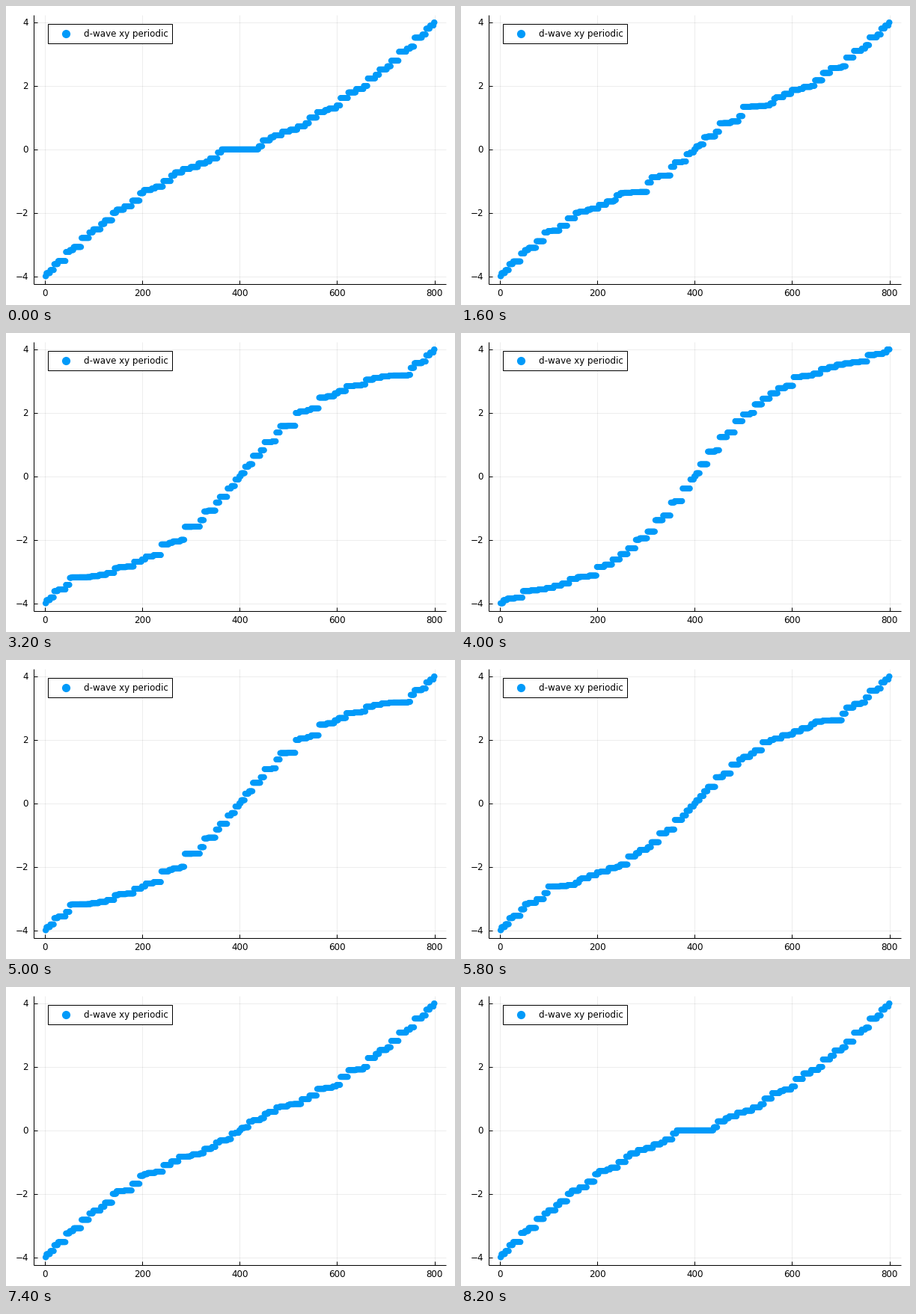
A matplotlib script for the animation above (8400 ms loop, 600 by 400 pixels).

```python
import numpy as np
import matplotlib.pyplot as plt
from matplotlib.animation import FuncAnimation
from matplotlib.patches import Rectangle

W, H, DPI = 600, 400, 100
PX = 72 / DPI                      # points per pixel
LEFT, RIGHT, TOP, BOTTOM = 37.2, 588.2, 11.8, 371.7
X_MIN, X_MAX = 1 - 0.03 * 799, 800 + 0.03 * 799
Y_MAX = 4.24
BLUE = "#009AF9"
FONT = dict(family="DejaVu Sans", size=11.9 * PX, color="black", va="baseline")

SITES = 20                         # lattice sites per side
STEPS = 20                         # pairing strength goes 0..4 in these steps
FRAMES = 2 * (STEPS + 1)


def to_px(x):
    return LEFT + (x - X_MIN) / (X_MAX - X_MIN) * (RIGHT - LEFT)


def to_py(y):
    return TOP + (Y_MAX - y) / (2 * Y_MAX) * (BOTTOM - TOP)


k = 2 * np.pi * np.arange(SITES) / SITES
kx, ky = np.meshgrid(k, k)
hopping = -2 * (np.cos(kx) + np.cos(ky))
pairing = np.sin(kx) * np.sin(ky)


def spectrum(delta):
    """Sorted quasiparticle energies of a periodic d_xy superconductor."""
    energy = np.hypot(hopping, delta * pairing).ravel()
    return np.sort(np.concatenate([-energy, energy]))


fig = plt.figure(figsize=(W / DPI, H / DPI), dpi=DPI, facecolor="white")
ax = fig.add_axes([0, 0, 1, 1])
ax.set_xlim(0, W)
ax.set_ylim(H, 0)
ax.axis("off")


def line(xs, ys, **style):
    ax.plot(xs, ys, color="black", lw=PX, solid_capstyle="butt", **style)


for x in range(0, 801, 200):
    px = to_px(x)
    line([px, px], [TOP, BOTTOM], alpha=0.07, zorder=1)
    line([px, px], [BOTTOM, BOTTOM - 5], zorder=2)
    ax.text(px, 388, str(x), ha="center", **FONT)

for y in range(-4, 5, 2):
    py = to_py(y)
    line([LEFT, RIGHT], [py, py], alpha=0.07, zorder=1)
    line([LEFT, LEFT + 5], [py, py], zorder=2)
    ax.text(30, py + 4.4, str(y).replace("-", "\u2212"), ha="right", **FONT)

line([LEFT, LEFT], [TOP, BOTTOM], zorder=2)
line([LEFT, RIGHT], [BOTTOM, BOTTOM], zorder=2)

# Per-point sizes keep every dot at its sub-pixel position
count = 2 * SITES ** 2
dot_x = to_px(np.arange(1, count + 1))
dots = ax.scatter(dot_x, to_py(spectrum(0)), s=np.full(count, (7.8 * PX) ** 2),
                  color=BLUE, linewidths=0, zorder=3)

ax.add_patch(Rectangle((55.5, 23.5), 166, 26, fc="white", ec="black",
                       lw=PX, zorder=4))
ax.scatter([80], [36.6], s=[(11.2 * PX) ** 2], color=BLUE, linewidths=0, zorder=5)
ax.text(103.6, 41, "d-wave xy periodic", ha="left", zorder=5, **FONT)


def update(i):
    step = min(i, FRAMES - 1 - i)
    dots.set_offsets(np.column_stack([dot_x, to_py(spectrum(4 * step / STEPS))]))
    return (dots,)


anim = FuncAnimation(fig, update, frames=FRAMES, interval=200,
                     repeat=True, repeat_delay=0, blit=False)
plt.show()
```
